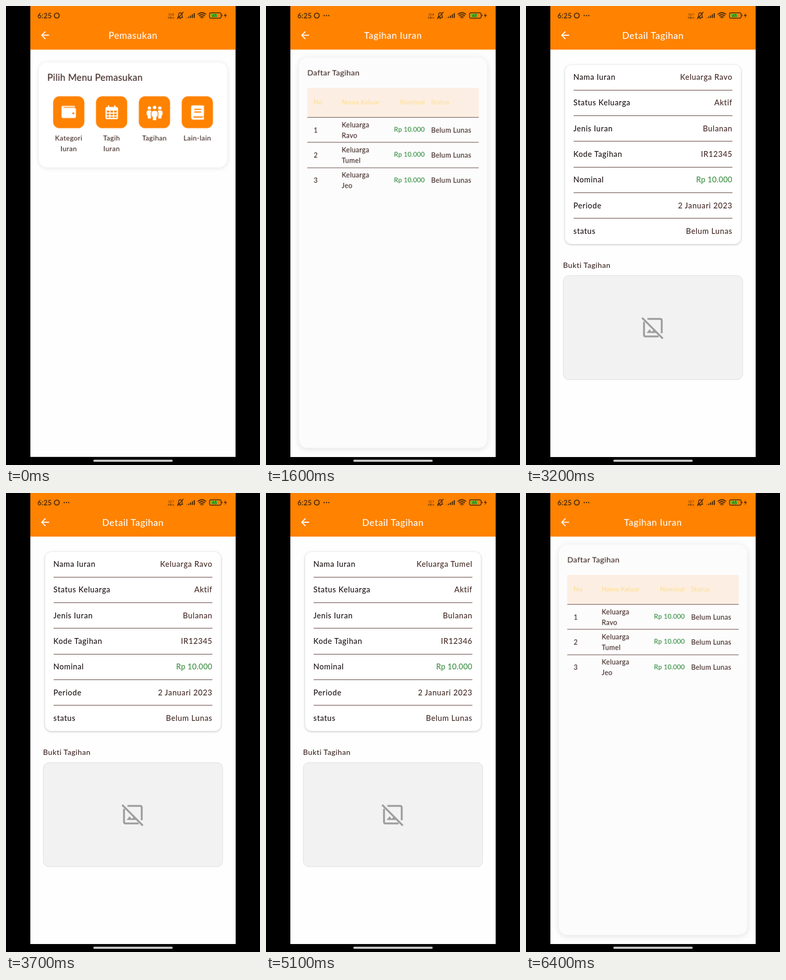
An HTML page that plays this animation: 480 by 864 pixels, repeating every 6500 ms.

```html
<!DOCTYPE html>
<html lang="id">
<head>
<meta charset="utf-8">
<title>Pemasukan</title>
<style>
  html, body { margin: 0; width: 100%; height: 100%; overflow: hidden; background: #000; }
  body { position: relative; font: 500 13px/20px Lato, "Open Sans", sans-serif; letter-spacing: .3px; color: #3a2420; }
  #screen { position: absolute; left: 46px; top: 0; width: 388px; height: 849px; overflow: hidden; clip-path: inset(0 .25px .5px); }
  .page { position: absolute; inset: 0; background: #fefefe; will-change: transform, opacity; }
  .page > *, .abs { position: absolute; box-sizing: border-box; }
  .bar { left: 0; top: 0; width: 100%; height: 82px; background: #ff8200; box-shadow: 0 0 1px #ff820099; }
  .bar h1 { position: absolute; left: 0; right: 0; top: 44px; margin: 0; font: 500 17.5px/24px Lato, sans-serif; letter-spacing: .55px; text-align: center; color: #fff; }
  .bar svg { position: absolute; left: 20px; top: 47px; }
  .card { border-radius: 16px; background: #fff; box-shadow: 0 1px 8px #0000001c; }
  .scrim { inset: 0; background: #000; opacity: 0; }

  .menu { left: 16px; top: 106px; width: 356px; height: 198px; }
  .menu h2 { position: absolute; left: 16px; top: 17px; margin: 0; font: 500 17.5px/24px Lato, sans-serif; }
  .item { position: absolute; top: 64px; width: 81px; text-align: center; letter-spacing: .4px; }
  .item svg { display: block; margin: 0 auto 8px; border-radius: 12px; background: #ff8200; }

  .list { left: 16px; top: 97px; width: 356px; height: 735px; background: #fcfcfc; box-shadow: 0 2px 12px #0000001e; }
  .list h2 { position: absolute; left: 16px; top: 19px; margin: 0; font: 500 14.5px/20px Lato, sans-serif; letter-spacing: .45px; }
  .row { position: absolute; left: 16px; width: 324px; height: 47.5px; border-top: 1px solid #5f433b; box-sizing: border-box; }
  .row.head { top: 56.500px; height: 55.5px; border: 0; background: #fdeee3; color: #ffe08c; font-size: 12.5px; letter-spacing: .1px; }
  .row span { position: absolute; top: 50%; transform: translateY(-50%); white-space: nowrap; }
  .row span:nth-of-type(1) { left: 12px; }
  .row span:nth-of-type(2) { left: 65px; }
  .row span:nth-of-type(3) { right: 102px; }
  .row span:nth-of-type(4) { left: 234px; }
  .row .sum { color: #2e8b3a; font-size: 12.5px; letter-spacing: .1px; }
  .press { position: absolute; inset: 0; background: #f9f9f9; opacity: 0; }

  .detail { left: 27.5px; top: 110.5px; width: 332.5px; height: 337px; padding: 0 16px; border-radius: 12px; box-shadow: 0 1px 4px #00000040; font-size: 14.5px; letter-spacing: .6px; }
  .detail p { display: flex; justify-content: space-between; align-items: center; margin: 0; height: 48.3px; box-sizing: border-box; border-bottom: 1px solid #5f433b; color: #1e1414; }
  .detail p:last-child { border: 0; }
  .detail b { font-weight: 500; color: #452b27; }
  .detail .sum { color: #3d9142; letter-spacing: .25px; }
  .proof { left: 24px; top: 478px; font-size: 14px; letter-spacing: .55px; }
  .photo { left: 24px; top: 507px; width: 340px; height: 197px; border: 1px solid #e0e0e0; border-radius: 11px; background: #f2f2f2; }

  #status { position: absolute; left: 0; top: 0; }
  #pill { position: absolute; left: 165px; top: 854px; width: 150px; height: 4px; border-radius: 2px; background: #c6c6c6; }
  .dot { position: absolute; width: 14px; height: 14px; margin: -7px; border-radius: 50%; background: radial-gradient(#0000000c 40%, #0000 70%); opacity: 0; }
</style>
</head>
<body>
<div id="screen"></div>

<svg id="status" width="480" height="40" fill="none" stroke="#4b2a08" stroke-width="1.4" stroke-linecap="round" stroke-linejoin="round">
  <g fill="#4b2a08" stroke="none">
    <text x="59.5" y="22.5" font-size="13" stroke="#4b2a08" stroke-width=".25">6:25</text>
    <g font-size="5.5" text-anchor="middle" letter-spacing="0">
      <text id="fast" x="312" y="17.5">13.8</text>
      <text id="slow" x="312" y="17.5">12.7</text>
      <text x="312" y="24">KB/s</text>
    </g>
    <g id="more"><circle cx="110" cy="18" r="1.2"/><circle cx="114.3" cy="18" r="1.2"/><circle cx="118.6" cy="18" r="1.2"/></g>
    <path d="M415.5 13l-4 5.5h3l-1.2 4.5 4.2-6h-3z"/>
  </g>
  <circle cx="96" cy="18" r="4.6" stroke-width="1.9"/>
  <path d="M324.5 21.5h9.5l-1.3-2v-3c0-5-6.5-5-6.5 0v3zM328 23.5h2.5M324 24l11-12.5"/>
  <path d="M341.5 22v.5M345 20.3v2.2M348.6 18v4.5M352.2 15.8v6.7M355.8 13.5v9" stroke-width="2.2" stroke-linecap="butt"/>
  <path d="M363 15.5q7.2-6 14.4 0M365.3 18.3q4.9-4 9.8 0M367.6 21q2.6-2 5.2 0" stroke-width="1.9"/>
  <circle cx="370.2" cy="23" r="1" fill="#4b2a08" stroke="none"/>
  <rect x="384.5" y="12.7" width="22" height="10.3" rx="3"/>
  <path d="M408.3 16.5v2.5"/>
  <rect x="386.5" y="14.7" width="13" height="6.3" rx="1" fill="#42c832" stroke="none"/>
  <text x="394" y="20.7" font-size="7.5" letter-spacing="0" text-anchor="middle" fill="#4b2a08" stroke="none">65</text>
</svg>
<div id="pill"></div>

<script>
const LOOP = 6500;
const stage = document.getElementById('screen');
const families = ['Ravo', 'Tumel', 'Jeo'];

const addPage = (title, body) => {
  const page = document.createElement('div');
  page.className = 'page';
  page.innerHTML = `<div class="bar"><h1>${title}</h1>
    <svg width="16" height="16" fill="none" stroke="#fff" stroke-width="1.9"><path d="M15.5 8H2M8.5 1L1.5 8l7 7"/></svg>
    </div>${body}<div class="scrim"></div>`;
  return stage.appendChild(page);
};

const person = (x, y, s) => `<g transform="translate(${x} ${y}) scale(${s})">
  <circle cy="-10" r="4"/><path d="M-6.5 0c0-6 13-6 13 0v5q0 2-2.5 3v5q0 2-2 2h-4q-2 0-2-2v-5q-2.5-1-2.5-3z"/></g>`;

const icons = {
  'Kategori<br>Iuran': `<path d="M18 18h22a2 2 0 0 1 2 2H20v1.5h20a3.5 3.5 0 0 1 3.5 3.5v13a3 3 0 0 1-3 3H19a3 3 0 0 1-3-3V20a2 2 0 0 1 2-2z"/>
    <circle cx="38.5" cy="32" r="1.9" fill="#ff8200"/>`,
  'Tagih<br>Iuran': `<path d="M24 17v5M36 17v5" stroke="#fff" stroke-width="2.5"/>
    <rect x="18" y="20" width="24" height="23" rx="3"/>
    <path d="M20.5 27h5v3.5h-5zM27.5 27h5v3.5h-5zM34.5 27h5v3.5h-5zM20.5 32.5h5V36h-5zM27.5 32.5h5V36h-5zM34.5 32.5h5V36h-5zM20.5 38h5v2.5h-5zM27.5 38h5v2.5h-5zM34.5 38h5v2.5h-5z" fill="#ff8200"/>`,
  'Tagihan': person(20, 30, .8) + person(40, 30, .8) +
    `<g stroke="#ff8200" stroke-width="1.5">${person(30, 31, 1)}</g>`,
  'Lain-lain': `<path d="M21 17h20a1.5 1.5 0 0 1 1.5 1.5V36q-2 3 0 5v3H22a4 4 0 0 1-4-4V20a3 3 0 0 1 3-3z"/>
    <path d="M24 24.5h13M24 29.5h13M22.5 39H40" stroke="#ff8200" stroke-width="2.3"/>`
};

const home = addPage('Pemasukan', `<div class="card menu"><h2>Pilih Menu Pemasukan</h2>${
  Object.entries(icons).map(([label, art], i) =>
    `<div class="item" style="left:${16 + i * 81}px"><svg width="59.5" height="60" viewBox="0 0 60 60" fill="#fff">${art}</svg>${label}</div>`
  ).join('')}</div>`);

const list = addPage('Tagihan Iuran', `<div class="card list"><h2>Daftar Tagihan</h2>
  <div class="row head"><span>No</span><span>Nama Keluar</span><span>Nominal</span><span>Status</span></div>${
  families.map((name, i) => `<div class="row" style="top:${111.5 + i * 47.5}px"><div class="press"></div>
    <span>${i + 1}</span><span>Keluarga<br>${name}</span><span class="sum">Rp 10.000</span><span>Belum Lunas</span></div>`
  ).join('')}</div>`);

const addDetail = i => {
  const fields = {
    'Nama Iuran': 'Keluarga ' + families[i], 'Status Keluarga': 'Aktif', 'Jenis Iuran': 'Bulanan',
    'Kode Tagihan': 'IR' + (12345 + i), 'Nominal': 'Rp 10.000', 'Periode': '2 Januari 2023', 'status': 'Belum Lunas'
  };
  const rows = Object.entries(fields).map(([key, value]) =>
    `<p>${key}<b${key === 'Nominal' ? ' class="sum"' : ''}>${value}</b></p>`).join('');
  return addPage('Detail Tagihan', `<div class="card detail">${rows}</div>
    <div class="proof">Bukti Tagihan</div>
    <div class="photo"><svg class="abs" style="left:147px;top:76px" width="44" height="44" fill="none" stroke="#9e9e9e" stroke-width="3.6">
      <path d="M11.5 5h24q3 0 3 3v24M5 10.5v24.5q0 3 3 3H32.500M1.5 3L40.500 42"/>
      <path d="M10 31.500l5.500-7 4 5 3-3.500 5.500 5.500z" fill="#9e9e9e" stroke="none"/></svg></div>`);
};

// Keys are [ms, value, easing]; the first and last values are held to the loop's ends.
const play = (el, prop, keys) => {
  const all = [[0, keys[0][1]], ...keys, [LOOP, keys.at(-1)[1]]];
  el.animate(all.map(([ms, value, easing = 'linear']) => ({ offset: ms / LOOP, [prop]: value, easing })),
    { duration: LOOP, iterations: Infinity });
};

const zoom = (t, from, to) => [
  [t, from, 'cubic-bezier(.3,0,.8,.15)'],
  [t + 50, from + (to - from) * .4, 'cubic-bezier(.05,.7,.1,1)'],
  [t + 300, to]
];
const dim = t => [[t + 62, 0], [t + 125, .6]];
const fadeIn = t => [[t + 37, 0], [t + 75, 1]];
const fadeOut = t => [[t + 25, 1], [t + 62, 0]];

const OPEN_LIST = 270;
const visits = [{ open: 2367, close: 3770 }, { open: 4370, close: 5200 }];

play(home, 'scale', zoom(OPEN_LIST, 1, 1.05));
play(home.querySelector('.scrim'), 'opacity', dim(OPEN_LIST));

play(list, 'opacity', fadeIn(OPEN_LIST));
play(list, 'scale', [
  ...zoom(OPEN_LIST, .85, 1),
  ...visits.flatMap(v => [...zoom(v.open, 1, 1.05), ...zoom(v.close, 1.1, 1)])
]);
play(list.querySelector('.scrim'), 'opacity',
  visits.flatMap(v => [...dim(v.open), [v.close, .6], [v.close, 0]]));

visits.forEach(({ open, close }, i) => {
  const page = addDetail(i);
  play(page, 'opacity', [...fadeIn(open), ...fadeOut(close)]);
  play(page, 'scale', [...zoom(open, .85, 1), ...zoom(close, 1, .9)]);
  play(list.querySelectorAll('.press')[i], 'opacity',
    [[open - 130, 0], [open - 70, 1], [open + 130, 1], [open + 400, 0]]);
});

const tap = (x, y, t) => {
  const dot = document.createElement('div');
  dot.className = 'dot';
  dot.style.cssText = `left:${x}px;top:${y}px`;
  document.body.append(dot);
  play(dot, 'opacity', [[t, 0], [t, 1], [t + 130, 1], [t + 180, 0]]);
};
tap(280, 212, 150);
tap(242, 230, 2290);
tap(74, 56, 3710);
tap(234, 294, 4260);
tap(74, 56, 5140);

const swap = (id, t, from, to) => play(document.getElementById(id), 'opacity', [[t, from], [t, to]]);
swap('more', 400, 0, 1);
swap('fast', 3000, 1, 0);
swap('slow', 3000, 0, 1);
</script>
</body>
</html>
```
